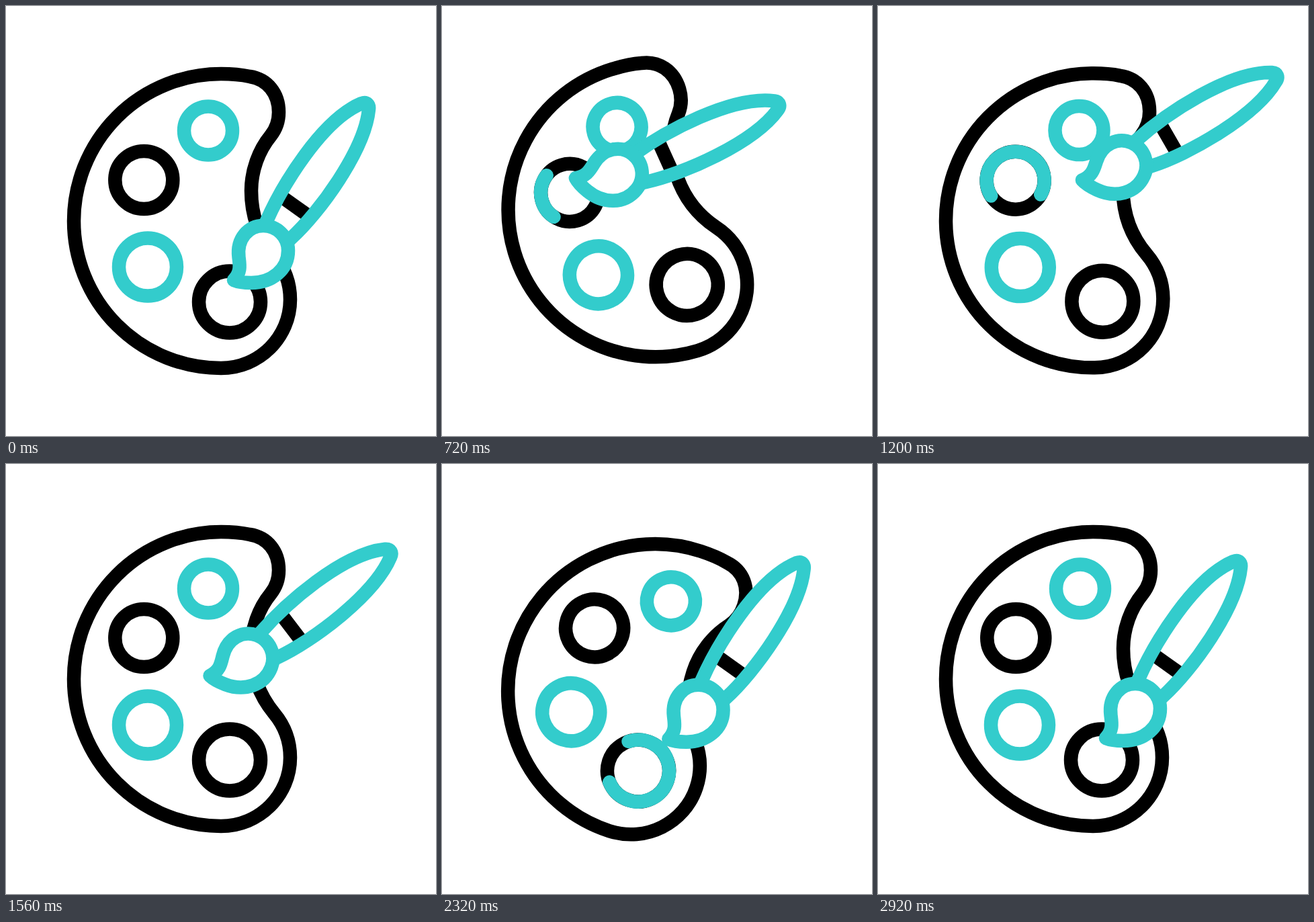
An HTML page that plays this animation: 640x640 px, repeating every 3 s.

```html
<!DOCTYPE html>
<html lang="en">
<head>
<meta charset="utf-8">
<title>Palette and brush</title>
<style>
  html, body { margin: 0; width: 100%; height: 100%; overflow: hidden; background: #fff; }
  svg { display: block; width: 100vw; height: 100vh; }
  svg * { stroke-width: 20.5; stroke-linejoin: round; fill: none; }
  .ink { stroke: #000; }
  .teal { stroke: #3cc; }
  .white { fill: #fff; }
  .dab { stroke-linecap: round; }
</style>
</head>
<body>
<svg viewBox="0 0 640 640">
  <g id="palette">
    <path class="ink" d="M320 539A219 219 0 0 1 320 101C335 101 349 102 363 105C389 109 406 130 406 158C406 172 402 183 394 193C376 215 365 245 365 275C365 310 376 343 399 371C414 389 423 412 423 437C423 493 377 539 320 539Z"/>
    <circle class="teal" cx="301" cy="185.5" r="36"/>
    <circle class="ink" cx="205.3" cy="259" r="43"/>
    <circle class="teal" cx="211" cy="388.5" r="43"/>
    <circle class="ink" cx="333" cy="440.5" r="46"/>
    <path class="teal dab"/>
    <path class="teal dab"/>
  </g>
  <g id="brush">
    <path class="white" d="M387 322C411 267 470 170 529 145C537 142 541 147 540 154C534 215 466 308 424 346Z"/>
    <path class="ink" d="M409 283L452 313.6"/>
    <path class="teal" d="M383 332L387 322C411 267 470 170 529 145C537 142 541 147 540 154C534 215 466 308 424 346L414 355"/>
    <path class="teal white" id="head" d="M339 408C350 396 348 386 346.5 374C343 346 361 327 383 327C403.5 327 420 343.5 420 364C420 393 395 412 365 412C355 412 346 411 339 408Z"/>
  </g>
</svg>
<script>
const LOOP = 3000, STEP = 40, SECOND_DIP = 1400;
const palette = document.getElementById('palette');
const brush = document.getElementById('brush');
const head = document.getElementById('head');
const dabs = document.querySelectorAll('.dab');

// Brush pose: x, y, angle, bend of the bristles
const REST = [430, 298, 0, 0];
const HOVER = [432.5, 197, 24.6, 0];

// Each dip touches a ring, drags it so the palette tilts, and leaves paint on it
const DIPS = [
  { start: 0, from: REST, touch: [304, 225, 32.2, 12], to: HOVER, drag: [-7, 8],
    tilt: -23, tiltAt: 480, ring: { x: 205.3, y: 259, r: 43, angle: 247 } },
  { start: SECOND_DIP, from: HOVER, touch: [406, 352, 0, 12], to: REST, drag: [-15, 9],
    tilt: 20, tiltAt: 440, ring: { x: 333, y: 440.5, r: 46, angle: 186 } }
];

function ease(t, from, to) {
  const x = Math.min(1, Math.max(0, (t - from) / (to - from)));
  return x * x * (3 - 2 * x);
}

const blend = (a, b, k) => a.map((v, i) => v + (b[i] - v) * k);

function brushPose(dip, t) {
  const [x, y, ...turn] = dip.touch, k = ease(t, 440, 600);
  const pressed = [x + dip.drag[0] * k, y + dip.drag[1] * k, ...turn];
  return blend(blend(dip.from, pressed, ease(t, 0, 440)), dip.to, ease(t, 600, 960));
}

const tiltOf = (dip, t) => dip.tilt * (ease(t, dip.tiltAt, 845) - ease(t, 845, 1240));

// Paint runs anticlockwise round the ring, drifts, then is wiped from its start
function dabPath({ x, y, r, angle }, t) {
  const base = angle - 130 * ease(t, 520, 1520);
  const front = 360 * ease(t, 520, 1120), back = 360 * ease(t, 1000, 1520);
  const point = deg => {
    const a = deg * Math.PI / 180;
    return `${x + r * Math.cos(a)} ${y + r * Math.sin(a)}`;
  };
  const length = front - back;
  return length < 0.5 ? '' :
    `M${point(base - back)}A${r} ${r} 0 ${+(length > 180)} 0 ${point(base - front)}`;
}

function draw(t) {
  const tilt = DIPS.reduce((sum, dip) => sum + tiltOf(dip, t - dip.start), 0);
  palette.setAttribute('transform', `rotate(${tilt} 262 320)`);
  DIPS.forEach((dip, i) => dabs[i].setAttribute('d', dabPath(dip.ring, t - dip.start)));

  const dip = DIPS[+(t >= SECOND_DIP)];
  const [x, y, angle, bend] = brushPose(dip, t - dip.start);
  brush.setAttribute('transform', `translate(${x} ${y}) rotate(${angle}) translate(-430 -298)`);
  head.setAttribute('transform', `rotate(${bend} 431 350)`);
}

const begin = performance.now();
function tick() {
  const t = (performance.now() - begin) % LOOP;
  draw(Math.floor(t / STEP) * STEP);
  requestAnimationFrame(tick);
}
tick();
</script>
</body>
</html>
```
